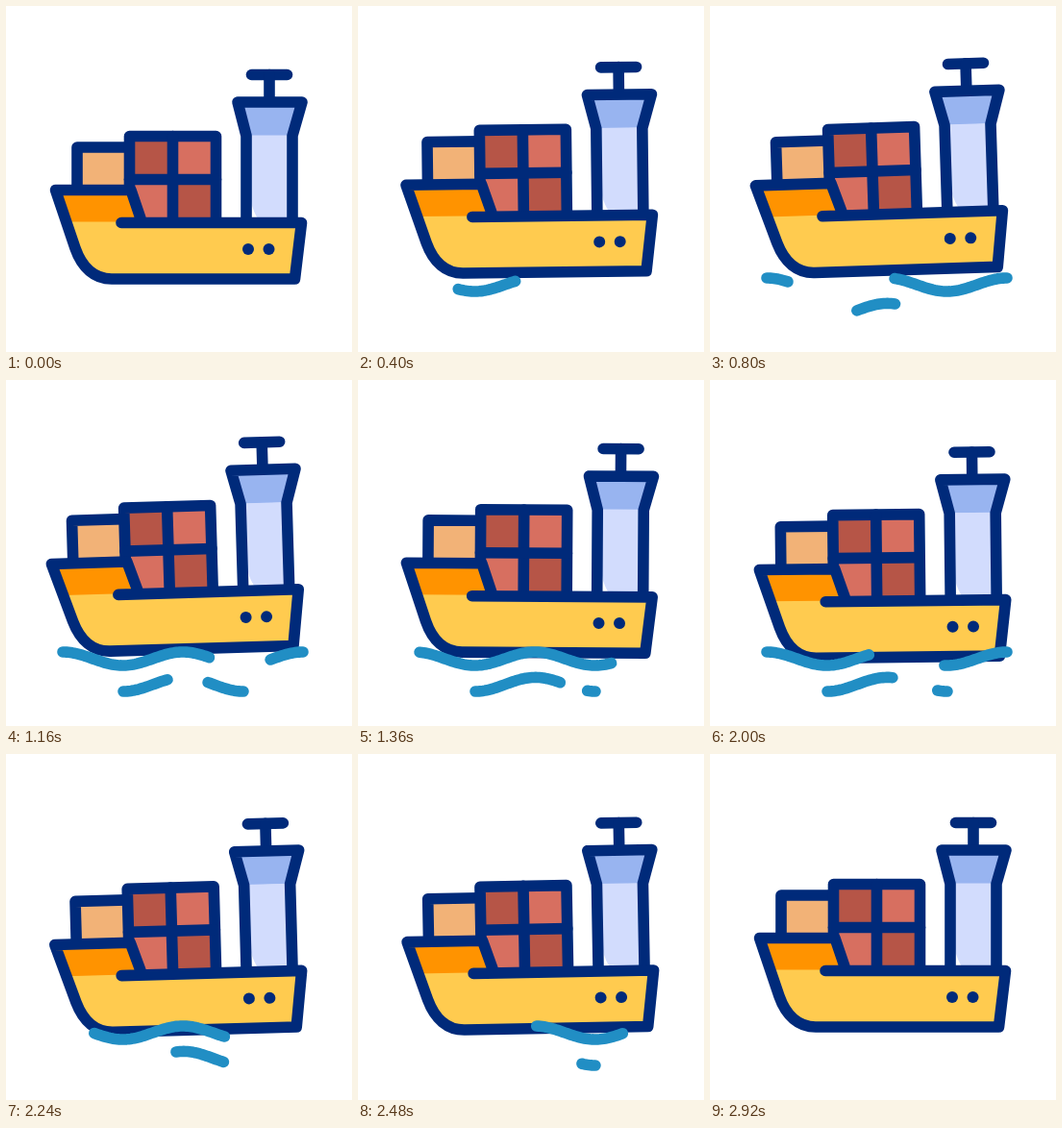
Recreate the animation shown at these times as an HTML page with a canvas. Size 360 by 360 pixels, loop 3 s.

```html
<!DOCTYPE html>
<html lang="en">
<head>
<meta charset="utf-8">
<title>Cargo ship</title>
<style>
  html, body { margin: 0; width: 100%; height: 100%; overflow: hidden; background: #fff; }
  canvas { display: block; width: 100vw; height: 100vh; }
</style>
</head>
<body>
<canvas id="stage"></canvas>
<script>
const SIZE = 360, LOOP = 3000, STEP = 40, LAST = 2920, LINE = 11.6;
const NAVY = '#002a7a', WAVE = '#218ec4', RUST = '#b65547', CORAL = '#d76f60';

const canvas = document.getElementById('stage');
const ctx = canvas.getContext('2d');
const ratio = window.devicePixelRatio || 1;
canvas.width = canvas.height = SIZE * ratio;

// Turning points of the ship: [time, value], eased in between
const tilt = [[0, 0], [1050, -2.1], [1620, 2.2], [2190, -1.6], [LAST, 0]];
const drift = [[0, 0], [1050, -5.2], [1620, 2.1], [2190, -1.1], [LAST, 0]];
const heave = [[0, 0], [620, -9.4], [1880, 4.7], [LAST, 0]];

const upper = { x: 59, width: 250, y: 290, rise: -7, from: 140, to: 2880 };
const lower = { x: 122, width: 125, y: 316.7, rise: 7.3, from: 540, to: 2570 };

function ease(keys, t) {
  const next = Math.max(1, keys.findIndex(key => key[0] >= t));
  const [t0, a] = keys[next - 1], [t1, b] = keys[next];
  return a + (b - a) * (1 - Math.cos(Math.PI * (t - t0) / (t1 - t0))) / 2;
}

function trace(points) {
  ctx.beginPath();
  for (let i = 0; i < points.length; i += 2) ctx.lineTo(points[i], points[i + 1]);
}

function line(...points) {
  trace(points);
  ctx.stroke();
}

function fill(color, ...points) {
  ctx.fillStyle = color;
  trace(points);
  ctx.fill();
}

function rect(color, x, y, w, h) {
  ctx.fillStyle = color;
  ctx.fillRect(x, y, w, h);
}

function dot(x, y, r) {
  ctx.beginPath();
  ctx.arc(x, y, r, 0, Math.PI * 2);
  ctx.fill();
}

function tower() {
  fill('#98b4f0', 241, 100, 308, 100, 298, 135, 250, 135);
  ctx.fillStyle = '#d2dcfd';
  ctx.beginPath();
  ctx.moveTo(250, 134.5);
  ctx.lineTo(298, 134.5);
  ctx.lineTo(298, 224);
  ctx.lineTo(264, 224);
  ctx.quadraticCurveTo(257, 215, 255, 203);
  ctx.lineTo(250, 203);
  ctx.fill();
  line(255.5, 71.5, 292.5, 71.5);
  line(274, 71.5, 274, 98);
  line(250, 223, 250, 135, 241, 100, 308, 100, 298, 135, 298, 223);
}

function cargo() {
  rect('#f2b277', 74, 147, 54, 44);
  line(74, 189, 74, 147, 128, 147);
  for (let i = 0; i < 4; i++) {
    const col = i % 2, row = i >> 1;
    rect(col === row ? RUST : CORAL, 128.5 + 45 * col, 135.5 + 45 * row, 45, 45);
  }
  line(128.5, 189, 128.5, 135.5, 218.5, 135.5, 218.5, 223);
  line(173.5, 135.5, 173.5, 223);
  line(128.5, 180.5, 218.5, 180.5);
}

function hullPath() {
  ctx.beginPath();
  ctx.moveTo(120, 225.5);
  ctx.lineTo(307.5, 225.5);
  ctx.lineTo(300.5, 284);
  ctx.lineTo(110, 284);
  ctx.bezierCurveTo(92, 284, 79, 272, 72, 252);
  ctx.lineTo(51.5, 191.5);
  ctx.lineTo(130, 191.5);
  ctx.lineTo(140, 221);
}

function hull() {
  hullPath();
  ctx.fillStyle = '#ffcb4f';
  ctx.fill();
  fill('#ff9300', 51.5, 191.5, 130, 191.5, 141, 224.5, 63, 224.5);
  hullPath();
  ctx.stroke();
  ctx.fillStyle = NAVY;
  dot(252, 253, 6);
  dot(273.5, 253, 6);
}

function ship(t) {
  ctx.save();
  ctx.translate(180 + ease(drift, t), 180 + ease(heave, t));
  ctx.rotate(ease(tilt, t) * Math.PI / 180);
  ctx.translate(-180, -180);
  ctx.strokeStyle = NAVY;
  tower();
  cargo();
  hull();
  ctx.restore();
}

function ripple(w, from, to) {
  const points = [], count = Math.ceil((to - from) * w.width / 2);
  for (let i = 0; i <= count; i++) {
    const x = w.x + w.width * (from + (to - from) * i / count);
    points.push(x, w.y + w.rise * Math.cos((x - w.x) / 125 * Math.PI * 2));
  }
  line(...points);
}

// A stretch of water runs three laps along its curve, growing and shrinking on the way
function wave(w, t) {
  const p = (t - w.from) / (w.to - w.from);
  if (p <= 0 || p >= 1) return;
  const middle = 3 * p + 0.07 + 0.055 * Math.cos(4 * Math.PI * (p - 0.34));
  const half = 0.405 * Math.sin(Math.PI * p);
  const tail = middle - half, head = Math.min(3, middle + half);
  ctx.strokeStyle = WAVE;
  for (let lap = Math.floor(tail); lap < head; lap++) {
    const from = Math.max(tail - lap, 0), to = Math.min(head - lap, 1);
    if (to > from) ripple(w, from, to);
  }
}

function draw(t) {
  ctx.setTransform(ratio, 0, 0, ratio, 0, 0);
  rect('#fff', 0, 0, SIZE, SIZE);
  ctx.lineWidth = LINE;
  ctx.lineCap = ctx.lineJoin = 'round';
  ship(t);
  wave(upper, t);
  wave(lower, t);
}

const start = performance.now();
function tick() {
  const t = (performance.now() - start) % LOOP;
  draw(Math.min(LAST, Math.floor(t / STEP) * STEP));
  requestAnimationFrame(tick);
}
tick();
</script>
</body>
</html>
```
